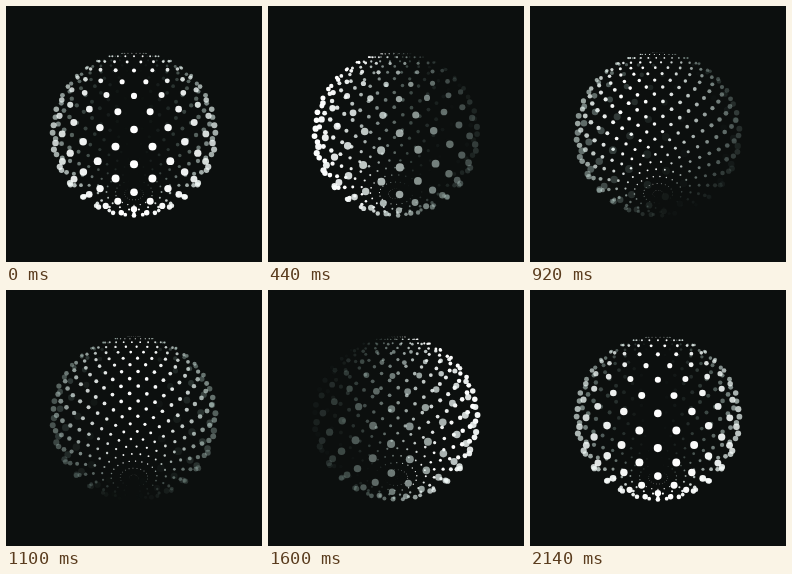
Write an HTML page with a canvas that moves like this. It is 256x256 px and loops after 2160 ms.

```html
<!DOCTYPE html>
<html lang="en">
<head>
<meta charset="utf-8">
<title>Dotted sphere</title>
<style>
html, body { margin: 0; height: 100%; overflow: hidden; background: #0c0f0e; }
canvas { display: block; }
</style>
</head>
<body>
<canvas id="stage" width="256" height="256"></canvas>
<script>
const ctx = document.getElementById('stage').getContext('2d');
const TAU = 2 * Math.PI;
const LOOP = 2160, STEP = 20;
const ROWS = 22, COLUMNS = 20;
const TILT = Math.PI / 8, DISTANCE = 2.5, FOCAL = 187, DOT = 6.3;

// Lit side fades smoothly to the dark side
function brightness(angle) {
  return ((1 + Math.cos(angle)) / 2) ** 0.9;
}

function project(lat, lon) {
  const ring = Math.cos(lat), up = Math.sin(lat);
  const x = ring * Math.sin(lon), z = ring * Math.cos(lon);
  const y = up * Math.cos(TILT) - z * Math.sin(TILT);
  const depth = DISTANCE - z * Math.cos(TILT) - up * Math.sin(TILT);
  return {
    x: 128 + FOCAL * x / depth,
    y: 128 - FOCAL * y / depth,
    r: DOT * ring / depth,
    depth
  };
}

function draw(p) {
  ctx.fillStyle = '#0c0f0e';
  ctx.fillRect(0, 0, 256, 256);

  // Each loop carries every dot diagonally to its neighbour in the next row
  const dots = [];
  for (let row = 0; row < ROWS; row++) {
    const lat = Math.PI * (0.5 - (row + p) / ROWS);
    for (let col = 0; col < COLUMNS; col++) {
      const lon = TAU * (col + (row + p) / 2) / COLUMNS;
      dots.push({ ...project(lat, lon), light: brightness(lon + TAU * p) });
    }
  }

  dots.sort((a, b) => b.depth - a.depth);
  for (const { x, y, r, light } of dots) {
    ctx.fillStyle = `rgba(${175 + 80 * light}, ${217 + 38 * light}, ${206 + 49 * light}, ${light})`;
    ctx.beginPath();
    ctx.arc(x, y, Math.max(0, r), 0, TAU);
    ctx.fill();
  }
}

function frame() {
  const time = performance.now() % LOOP;
  draw(Math.floor(time / STEP) * STEP / LOOP);
  requestAnimationFrame(frame);
}
frame();
</script>
</body>
</html>
```
